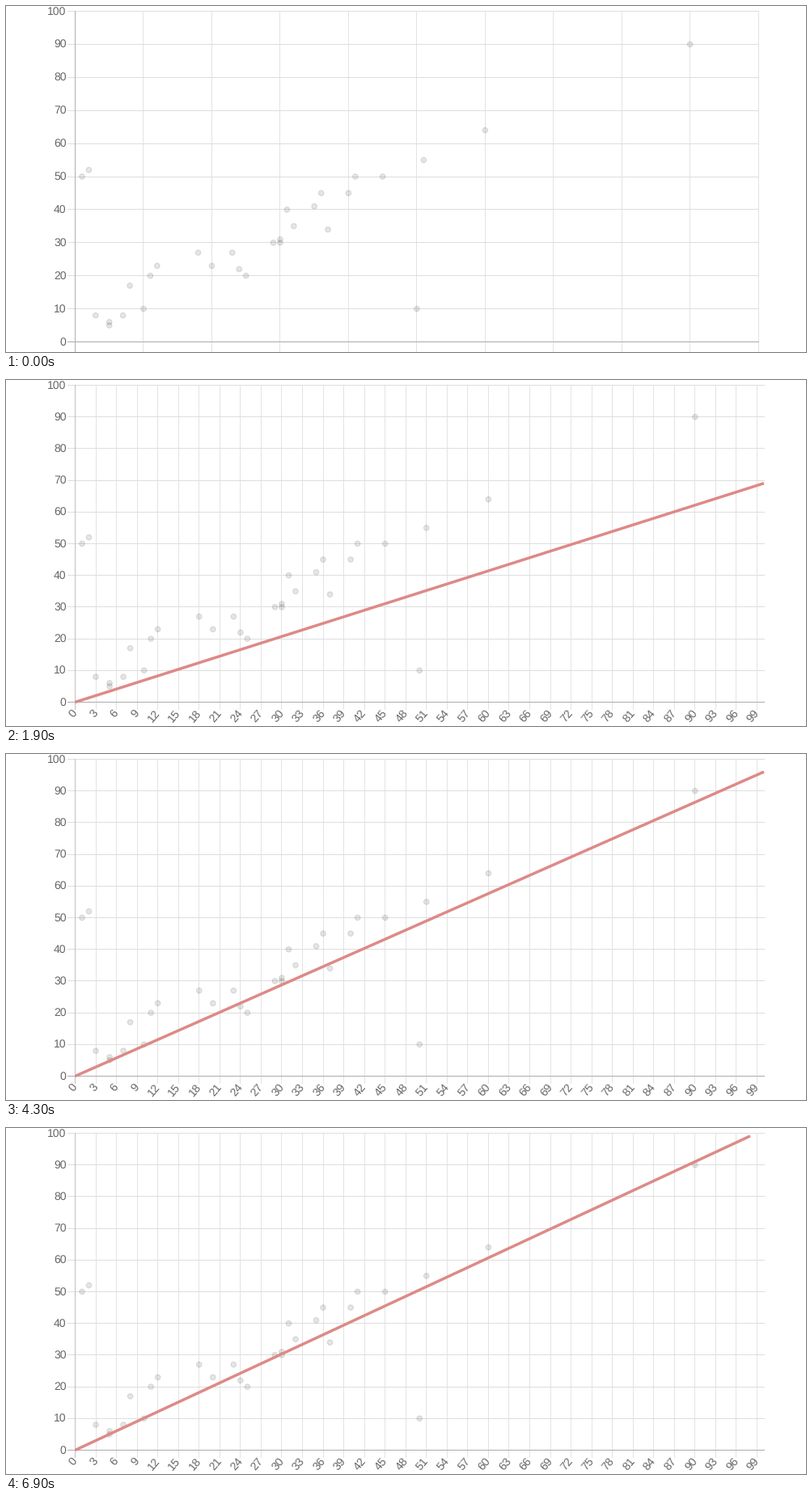
A matplotlib script for the animation above (7 s loop, 989 px wide and 428 px high).

```python
import math

import matplotlib.pyplot as plt
from matplotlib.animation import FuncAnimation
from matplotlib.collections import LineCollection, PatchCollection
from matplotlib.patches import Circle, Rectangle

W, H, DPI = 989, 428, 100
FRAMES, INTERVAL = 70, 100
PX = 72 / DPI  # points per pixel
LEFT, TOP = 85.5, 6.5
TRAIN_START = 3
RATE = 0.0705

# most points lie on lines parallel to y = x: lift above it -> x values
BANDS = {
    0: [5, 10, 30, 90],
    1: [5, 7, 29, 30],
    3: [20, 32],
    4: [23, 51, 60],
    5: [3, 40, 45],
    9: [8, 11, 18, *range(31, 42, 5)],
}
STRAYS = [(1, 50), (2, 52), (12, 23), (24, 22), (25, 20), (35, 41), (37, 34),
          (50, 10)]
DATA = STRAYS + [(x, x + lift) for lift, xs in BANDS.items() for x in xs]
BEST = sum(x * y for x, y in DATA) / sum(x * x for x, _ in DATA)

plt.rcParams["font.family"] = "Liberation Sans"
plt.rcParams["text.hinting"] = "none"
fig = plt.figure(figsize=(W / DPI, H / DPI), dpi=DPI, facecolor="white")
ax = fig.add_axes([0, 0, 1, 1])
ax.set_xlim(0, W)
ax.set_ylim(H, 0)
ax.axis("off")


def crisp(v):
    return math.floor(v) + 0.5


class Chart:
    """Grid, labels and points of a 0-100 by 0-100 scatter chart."""

    def __init__(self, right, bottom, x_step, tick_end, axis_color):
        self.right, self.bottom = right, bottom
        self.artists = []
        xs = [crisp(self.x(v)) for v in range(0, 101, x_step)]
        ys = [crisp(self.y(v)) for v in range(0, 101, 10)]
        edge = math.floor(right) + 1
        self.rules([((x, TOP - 0.5), (x, tick_end)) for x in xs[1:]], "#e3e3e3")
        self.rules([((76, y), (edge, y)) for y in ys[1:]], "#dedede")
        self.rules([((LEFT, TOP - 0.5), (LEFT, tick_end))], axis_color)
        self.rules([((76, ys[0]), (edge, ys[0]))], "#ababab")
        for v in range(0, 101, 10):
            self.label(74.7, self.y(v) - 1.2, v)
        dots = PatchCollection(
            [Circle((self.x(x), self.y(y)), 3.3) for x, y in DATA],
            facecolor=(0, 0, 0, 0.1), edgecolor=(0, 0, 0, 0.11),
            linewidth=1.1 * PX, zorder=3)
        dots.set_snap(False)
        self.artists.append(ax.add_collection(dots, autolim=False))

    def x(self, v):
        return LEFT + (self.right - LEFT) * v / 100

    def y(self, v):
        return self.bottom - (self.bottom - TOP) * v / 100

    def rules(self, segments, color):
        lines = LineCollection(segments, colors=color, linewidths=PX, zorder=1)
        lines.set_snap(False)
        self.artists.append(ax.add_collection(lines, autolim=False))

    def label(self, x, y, value, angle=0):
        self.artists.append(ax.text(
            x, y, str(value), size=14 * PX, color="#666666", rotation=angle,
            rotation_mode="anchor", ha="right", va="center_baseline"))

    def show(self, on):
        for artist in self.artists:
            artist.set_visible(on)


empty = Chart(930.2, 415.5, 10, H, "#b0b0b0")
fitted = Chart(937, 398.5, 3, 408, "#c0c0c0")
for v in range(0, 100, 3):
    fitted.label(fitted.x(v) - 0.9, 409, v, angle=50)

fit_line, = ax.plot([], [], color="#dd8a87", lw=3.5 * PX, zorder=4,
                    solid_capstyle="butt")
fit_line.set_clip_path(Rectangle((LEFT - 0.5, 0), fitted.right - LEFT + 1, H,
                                 transform=ax.transData))


def draw(i):
    training = i >= TRAIN_START
    empty.show(not training)
    fitted.show(training)
    fit_line.set_visible(training)
    if training:
        slope = BEST * (1 - math.exp(-RATE * (i - TRAIN_START)))
        # the line stops at the last whole x that stays inside the chart
        end = max(x for x in range(101) if slope * x <= 100)
        fit_line.set_data([fitted.x(0), fitted.x(end)],
                          [fitted.y(0), fitted.y(slope * end)])
    return [fit_line]


anim = FuncAnimation(fig, draw, frames=FRAMES, interval=INTERVAL,
                     repeat=True, repeat_delay=0, blit=False)
plt.show()
```
